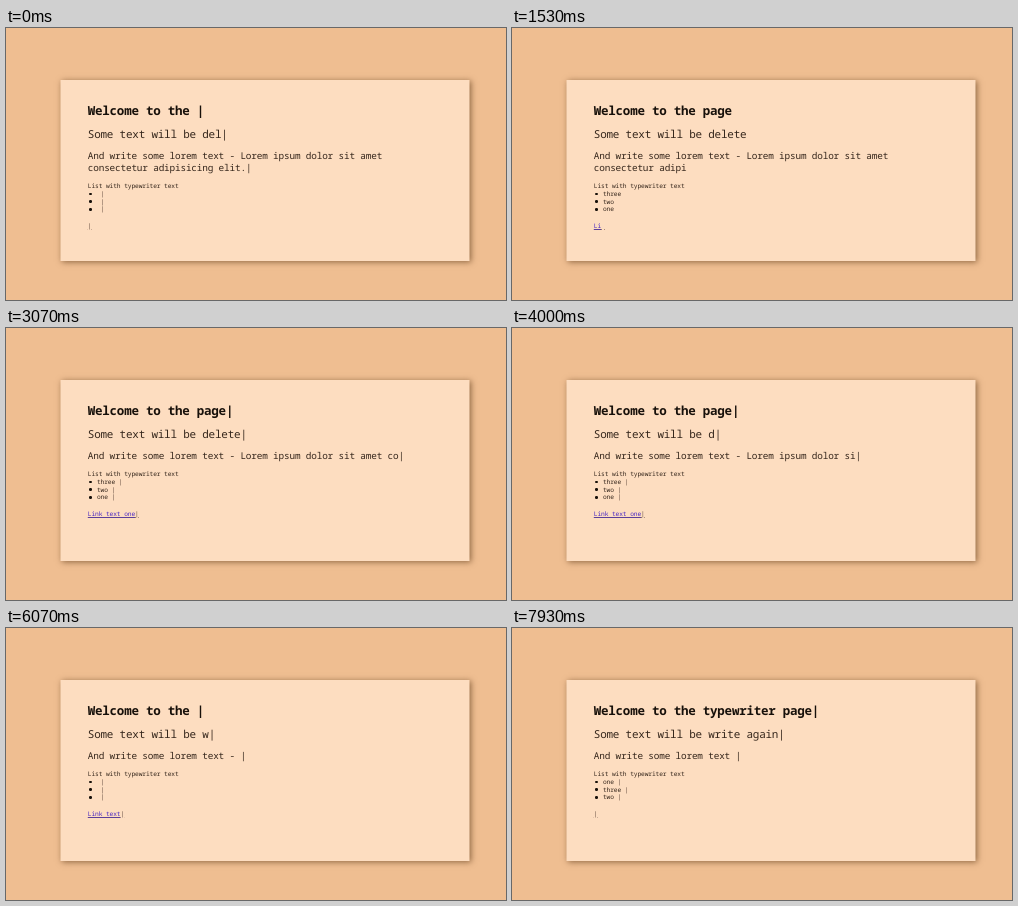
An HTML page that plays this animation: 500 px wide and 272 px high, repeating every 8000 ms.

```html
<!DOCTYPE html>
<html lang="en">
<head>
<meta charset="utf-8">
<title>Typewriter</title>
<style>
  html, body { margin: 0; width: 100%; height: 100%; overflow: hidden; background: #efbe91; }
  .stage {
    position: relative; width: 500px; height: 272px; overflow: hidden;
    font-family: "Noto Sans Mono", "DejaVu Sans Mono", monospace;
    color: #35261b; text-rendering: geometricPrecision;
  }
  .card {
    position: absolute; width: 409px; height: 181.2px; transform: translate(54.5px, 52px);
    background: #fdddc0; box-shadow: 1.3px 1.3px 6px rgba(75, 42, 12, .6);
  }
  .line { margin: 0; letter-spacing: -.0186em; white-space: pre-wrap; }
  .title, .sub, .flow { position: absolute; left: 81.8px; width: 355.5px; }
  .title { top: 74.7px; font-size: 12.51px; font-weight: 600; line-height: 16px; color: #17100a; }
  .sub { top: 99.5px; font-size: 10.945px; line-height: 14px; }
  .flow { top: 121.8px; }
  .para { font-size: 9.382px; line-height: 12px; }
  .small { font-size: 6.255px; line-height: 7.8px; }
  .label { margin-top: 8.3px; }
  .item { position: relative; padding-left: 9.1px; }
  .item::before {
    content: ""; position: absolute; left: 1.4px; top: 2.7px;
    width: 2.4px; height: 2.4px; border-radius: 50%; background: #17100a;
  }
  .link { margin-top: 8.5px; }
  .link span { text-decoration: underline .6px; text-underline-offset: .8px; }
  .link .text { color: #4a28c4; text-decoration-color: #5b3f9a; }
  .cursor { animation: blink 1s step-end infinite; }
  .item .cursor, .link .cursor { color: #5a4638; }
  .link .cursor { text-decoration-color: #8a6f66; animation-name: blink-ink; }
  @keyframes blink { 22% { opacity: 0; } 70% { opacity: 1; } }
  @keyframes blink-ink { 22% { color: transparent; } 70% { color: #5a4638; } }
</style>
</head>
<body>
<div class="stage">
  <div class="card"></div>
  <h1 class="line title"><span class="text"></span><span class="cursor">|</span></h1>
  <p class="line sub"><span class="text"></span><span class="cursor">|</span></p>
  <div class="flow">
    <p class="line para"><span class="text"></span><span class="cursor">|</span></p>
    <p class="line small label">List with typewriter text</p>
    <div class="line small item"><span class="text"></span> <span class="cursor">|</span></div>
    <div class="line small item"><span class="text"></span> <span class="cursor">|</span></div>
    <div class="line small item"><span class="text"></span> <span class="cursor">|</span></div>
    <p class="line small link"><span class="text"></span><span class="cursor">|</span></p>
  </div>
</div>
<script>
  const LOOP = 8000;
  const KEY = 101.6; // ms per keystroke

  // Per line: fixed start, then words as [word, first key typed, first key deleted]
  const lines = [
    ["Welcome to the ", ["page", 585, 4060], ["typewriter page", 6473]],
    ["Some text will be ", ["delete", -214, 3510], ["write again", 6069]],
    ["And write some lorem text ",
      ["- Lorem ipsum dolor sit amet consectetur adipisicing elit.", -LOOP, 391]],
    ["", ["three", 688, 4210], ["one", 6730]],
    ["", ["two", 1087, 4437], ["three", 6750]],
    ["", ["one", 1087, 4437], ["two", 6750]],
    ["", ["Link text one", 1407, 5740]]
  ];
  const slots = document.querySelectorAll(".text");

  function keys(t, first, max) {
    return Math.max(0, Math.min(max, Math.floor((t - first) / KEY) + 1));
  }

  function visible(t, [word, typed, deleted = Infinity]) {
    const n = word.length;
    return word.slice(0, keys(t, typed, n) - keys(t, deleted, n));
  }

  function draw(t) {
    lines.forEach(([start, ...words], i) => {
      const text = start + words.map(w => visible(t, w)).join("");
      if (slots[i].textContent !== text) slots[i].textContent = text;
    });
  }

  let origin;
  function tick(now) {
    origin ??= now;
    draw((now - origin) % LOOP);
    requestAnimationFrame(tick);
  }
  draw(0);
  requestAnimationFrame(tick);
</script>
</body>
</html>
```
